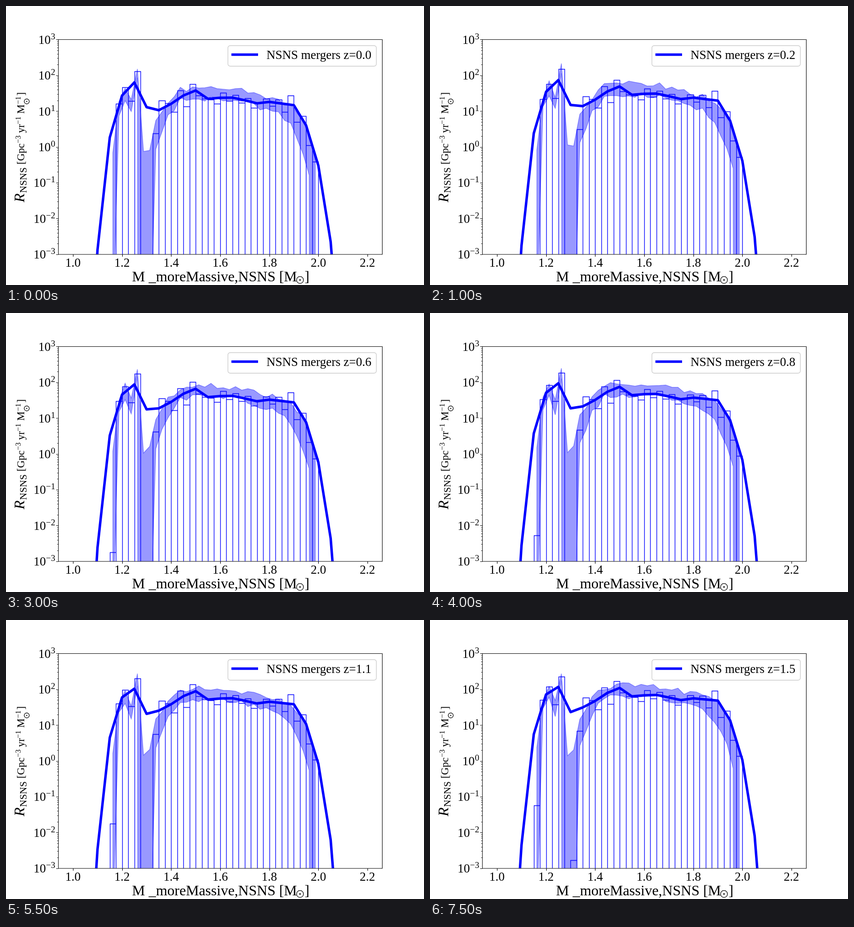
An HTML page for the animation above (8 s loop, 917 by 611 pixels).

```html
<!DOCTYPE html>
<html lang="en">
<head>
<meta charset="utf-8">
<title>Merger rate by mass</title>
<style>
html, body { margin: 0; width: 100%; height: 100%; overflow: hidden; background: #fff; }
svg { display: block; width: 917px; height: 611px; }
text { font-family: "Liberation Serif", "Times New Roman", serif; font-size: 27px; }
.axis { fill: none; stroke: #000; stroke-width: 1.11; }
#band { fill: #00f; fill-opacity: .4; stroke: #00f; stroke-opacity: .4; stroke-width: 1.39; }
#bars { fill: none; stroke: #00f; stroke-width: 1.39; }
#curve { fill: none; stroke: #00f; stroke-width: 5.5; stroke-linejoin: round; }
</style>
</head>
<body>
<svg viewBox="0 0 917 611">
  <clipPath id="plot"><rect x="114.6" y="73.3" width="710.7" height="470.5"/></clipPath>
  <g clip-path="url(#plot)">
    <path id="band"/>
    <path id="bars"/>
    <path id="curve"/>
  </g>
  <path class="axis" id="major"/>
  <path class="axis" id="minor" style="stroke-width:.83"/>
  <path class="axis" d="M115 73.5H825.5V544H115Z"/>
  <g id="labels"></g>
  <g id="yLabel" transform="translate(40 430) rotate(-90)"></g>
  <rect x="486.8" y="86.7" width="325.7" height="45" rx="5" fill="#fff" fill-opacity=".8" stroke="#ccc" stroke-width="1.39"/>
  <path d="M494.5 106.5H553" stroke="#00f" stroke-width="5.5"/>
  <text id="legend" x="571.5" y="116"></text>
</svg>
<script>
const $ = id => document.getElementById(id);
const STEP = 500, COUNT = 16, Z_MAX = 1.5;
const FIRST_MASS = 1.15, BIN = .025, BINS = 34, NONE = -99;
const SIGMA = .021; // smoothing width of the thick curve, in solar masses

const massX = m => 114.6 + (m - .94) * 538.4;
const rateY = e => 73.3 + (3 - e) * 78.41;
const snap = v => Math.round(v) + .5;
const center = bin => FIRST_MASS + (bin + .5) * BIN;
const bell = (m, mean, sigma) => Math.exp(-(((m - mean) / sigma) ** 2) / 2);

// log10 rate of each mass bin at z = 0.
const START = [NONE, 1.21, 1.66, 1.28, 2.11, NONE, NONE, .38, 1.3, 1.22, .97, 1.58, 1.13, 1.76, 1.44, 1.35, 1.32,
  1.21, 1.51, 1.28, 1.45, 1.23, 1.36, 1.09, 1.25, 1.34, 1.14, 1.32, .98, 1.44, .69, .86, .04, -.42];

// Bins that begin empty and fill as a power of z: their log10 rate at the end.
const LATE = { 0: -1.24, 6: -2.77 };

// Key points of the band at z = 0: bin, log10 of the upper and the lower edge.
const BAND = [
  [0, -.14, -4.86], [1, 1.22, .93], [2, 1.69, 1.34], [3, 1.35, .97], [4, 2.24, 1.96],
  [5, -.08, NONE], [6, -.04, -6], [7, .75, -.04], [9, 1.26, .84], [11, 1.59, 1.31],
  [15, 1.69, 1.35], [20, 1.6, 1.31], [27, 1.31, .93], [29, 1.16, .62], [31, .75, -.12],
  [32, .3, -.76], [33, -.33, NONE]
];

// Growth in decades: least near the first peak, most at the outer masses.
function growth(m, z) {
  const total = .46 + .1 * ((m - 1.55) / .45) ** 2 - .255 * bell(m, 1.26, .036);
  return total * (z / Z_MAX) ** .7;
}

function barRate(bin, z) {
  if (bin in LATE) return LATE[bin] + 3.8 * Math.log10(Math.max(z, .01) / Z_MAX);
  return START[bin] + growth(center(bin), z);
}

// The thick curve is the histogram smoothed with a Gaussian.
function smoothRate(m, rates) {
  const sum = rates.reduce((total, e, bin) => total + 10 ** e * bell(m, center(bin), SIGMA), 0);
  return Math.log10(sum * BIN / (SIGMA * Math.sqrt(2 * Math.PI)));
}

function noise(a, b) {
  const v = Math.sin(a * 127.1 + b * 311.7) * 43758.5453;
  return v - Math.floor(v) - .5;
}

function bandEdge(bin, side, z) {
  const i = Math.max(1, BAND.findIndex(p => p[0] >= bin));
  const a = BAND[i - 1], b = BAND[i], u = (bin - a[0]) / (b[0] - a[0]);
  const jitter = .16 * noise(bin + 1, z * 10 + side * 17);
  return a[side] + (b[side] - a[side]) * u + growth(center(bin), z) + jitter;
}

const polyline = points => "M" + points.map(p => p.map(v => v.toFixed(2)).join(" ")).join("L");
const range = (n, fn) => Array.from({ length: n }, (_, i) => fn(i));

function draw(z) {
  const rates = range(BINS, bin => barRate(bin, z));
  $("bars").setAttribute("d", rates.map((e, bin) => {
    const left = snap(massX(FIRST_MASS + bin * BIN));
    const right = snap(massX(FIRST_MASS + (bin + 1) * BIN));
    return e > -3 ? `M${left} 544V${snap(rateY(e))}H${right}V544` : "";
  }).join(""));

  $("curve").setAttribute("d", polyline(range(22, i => {
    const m = 1.05 + .05 * i;
    return [massX(m), rateY(smoothRate(m, rates))];
  })));

  const edge = side => range(BINS, bin => [massX(center(bin)), rateY(bandEdge(bin, side, z))]);
  $("band").setAttribute("d", polyline([...edge(1), ...edge(2).reverse()]) + "Z");
  $("legend").textContent = "NSNS mergers z=" + z.toFixed(1);
}

function addText(parent, str, x, y, size = 27, style = "") {
  const el = document.createElementNS("http://www.w3.org/2000/svg", "text");
  el.textContent = str;
  el.setAttribute("x", x);
  el.setAttribute("y", y);
  el.setAttribute("style", `font-size:${size}px;${style}`);
  $(parent).append(el);
}

function addSun(parent, x, y, r) {
  $(parent).insertAdjacentHTML("beforeend",
    `<circle cx="${x}" cy="${y}" r="${r}" fill="none" stroke="#000" stroke-width="1.3"/><circle cx="${x}" cy="${y}" r="${r * .22}"/>`);
}

function buildAxes() {
  let major = "", minor = "";
  for (let i = 0; i < 7; i++) {
    const m = 1 + .2 * i;
    major += `M${snap(massX(m))} 544v4.9`;
    addText("labels", m.toFixed(1), massX(m), 570.5, 27, "text-anchor:middle");
  }
  for (let e = -3; e <= 3; e++) {
    const y = rateY(e);
    major += `M115 ${snap(y)}h-4.9`;
    addText("labels", "10", e < 0 ? 87.5 : 98, y + 9.5, 27, "text-anchor:end");
    addText("labels", String(e).replace("-", "\u2212"), 108, y - .5, 19, "text-anchor:end");
    for (let n = 2; n < 10 && e < 3; n++) minor += `M115 ${snap(rateY(e + Math.log10(n)))}h-2.8`;
  }
  $("major").setAttribute("d", major);
  $("minor").setAttribute("d", minor);

  addText("labels", "M _moreMassive,NSNS [M", 276.5, 603, 32);
  addSun("labels", 645, 600, 7.6);
  addText("labels", "]", 655, 603, 32);

  addText("yLabel", "R", 0, 0, 32, "font-style:italic");
  addText("yLabel", "NSNS", 20.5, 5, 22);
  addText("yLabel", "[Gpc", 83, 0, 23);
  addText("yLabel", "\u22123", 129.5, -8, 16);
  addText("yLabel", "yr", 152, 0, 23);
  addText("yLabel", "\u22121", 171, -8, 16);
  addText("yLabel", "M", 194, 0, 23);
  addText("yLabel", "\u22121", 215, -8, 16);
  addSun("yLabel", 221, 5.5, 5.5);
  addText("yLabel", "]", 233.5, 0, 23);
}

let shown = -1;
function tick(now) {
  const i = Math.floor(now / STEP) % COUNT;
  if (i !== shown) draw((shown = i) / 10);
  requestAnimationFrame(tick);
}

buildAxes();
draw(0);
requestAnimationFrame(tick);
</script>
</body>
</html>
```
